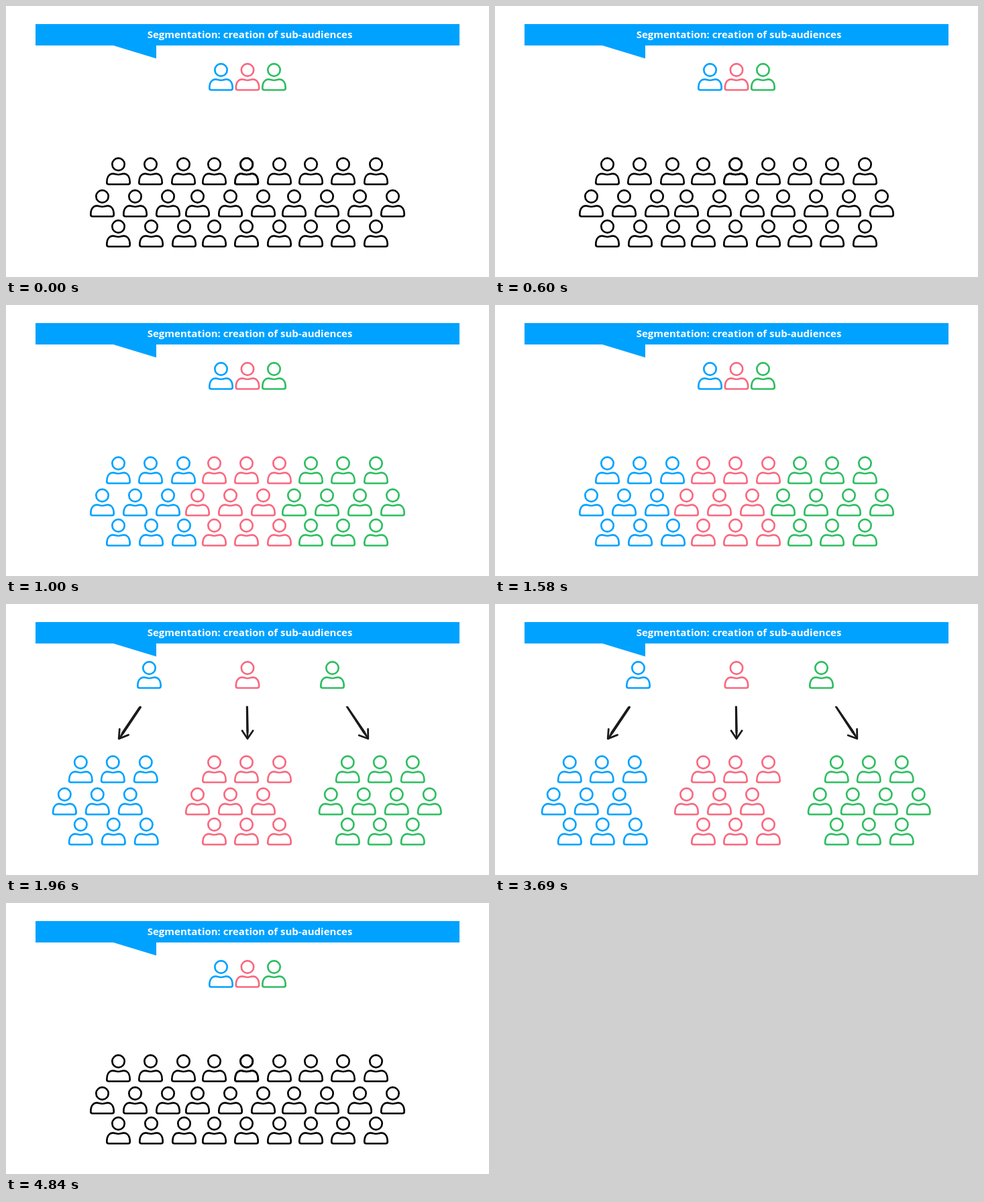
Recreate the animation shown at these times as an HTML page. Size 720 px wide and 405 px high, loop 4880 ms.

```html
<!DOCTYPE html>
<html lang="en">
<head>
<meta charset="utf-8">
<title>Segmentation</title>
<style>
  html, body { margin: 0; width: 100%; height: 100%; overflow: hidden; background: #fff; }
  svg { display: block; width: 100%; height: 100%; }
  text { font: 700 15px "Open Sans", sans-serif; fill: #fff; text-anchor: middle; }
  .person { fill: none; stroke-width: 2.7; stroke-linejoin: round; }
  .arrow { fill: #1a1a1a; stroke: #1a1a1a; stroke-linecap: round; stroke-linejoin: round; }
</style>
</head>
<body>
<svg viewBox="0 0 720 405">
  <defs>
    <g id="person" class="person">
      <circle cy="10.6" r="9.2"/>
      <path d="M-14.6 40.5H14.6Q17.2 40.5 17.2 37.8C17.2 30 14 24.6 7.8 24.6C5 24.6 3.5 26 0 26S-5 24.6 -7.8 24.6C-14 24.6 -17.2 30 -17.2 37.8Q-17.2 40.5 -14.6 40.5Z"/>
    </g>
  </defs>
  <path fill="#00a2ff" d="M44 27H676V59H224V78.5L160 59H44Z"/>
  <text x="363.6" y="48">Segmentation: creation of sub-audiences</text>
  <g id="people"></g>
  <g id="arrows" class="arrow">
    <path stroke-width="1.6" d="M200.8 153.3L201.2 154.6L175.5 193L168.8 201.5L173.3 191.8L198.8 154Z"/>
    <path stroke-width="2.8" fill="none" d="M169.3 187L168.2 201.4L182.6 195.6"/>
    <path stroke-width="1.6" d="M358.6 153.4H360.2L361 190L360 201L359 190Z"/>
    <path stroke-width="2.8" fill="none" d="M352 189.3L360 201.3L368.2 189.3"/>
    <path stroke-width="1.6" d="M507.6 153.6L509.2 153.5L534.8 191L540 201.4L532.6 192Z"/>
    <path stroke-width="2.8" fill="none" d="M526.2 196.2L539.8 201.3L539.6 186.8"/>
  </g>
</svg>
<script>
const LOOP = 4880, COLOURED = 1000, SPLIT = 1960, RESET = 4840;
const ROW_TOPS = [226, 274, 319];
const audiences = [
  { colour: '#00a2ff', leader: [320.5, 213.5], shift: -56.2,
    rows: [[167.5, 215.5, 264.5], [143.5, 192.5, 241.5], [167.5, 216.5, 265.5]] },
  { colour: '#f9687f', leader: [360, 360], shift: 0,
    rows: [[310.5, 358.5, 407.5], [285.5, 334.5, 383.5], [310.5, 358.5, 407.5]] },
  { colour: '#2dbe60', leader: [399.5, 486.5], shift: 54.8,
    rows: [[454.5, 502.5, 551.5], [429.5, 478.5, 527.5, 576.5], [454.5, 502.5, 551.5]] }
];
const people = document.getElementById('people');
const arrows = document.getElementById('arrows');

const person = (x, y, colour) =>
  `<use href="#person" x="${x}" y="${y}" stroke="${colour}"/>`;

function draw(stage) {
  const split = stage === 2;
  people.innerHTML = audiences.map(({ colour, leader, shift, rows }) =>
    person(leader[split ? 1 : 0], 85, colour) +
    rows.map((row, r) => row.map(x =>
      person(x + (split ? shift : 0), ROW_TOPS[r], stage ? colour : '#000')
    ).join('')).join('')
  ).join('');
  // The middle black figure is doubled, which makes its outline heavier.
  if (stage === 0) people.innerHTML += person(358.8, ROW_TOPS[0], '#000');
  arrows.style.display = split ? '' : 'none';
}

let shown = -1;
const start = performance.now();
function tick() {
  const t = (performance.now() - start) % LOOP;
  const stage = t < COLOURED || t >= RESET ? 0 : t < SPLIT ? 1 : 2;
  if (stage !== shown) draw(shown = stage);
  requestAnimationFrame(tick);
}
tick();
</script>
</body>
</html>
```
